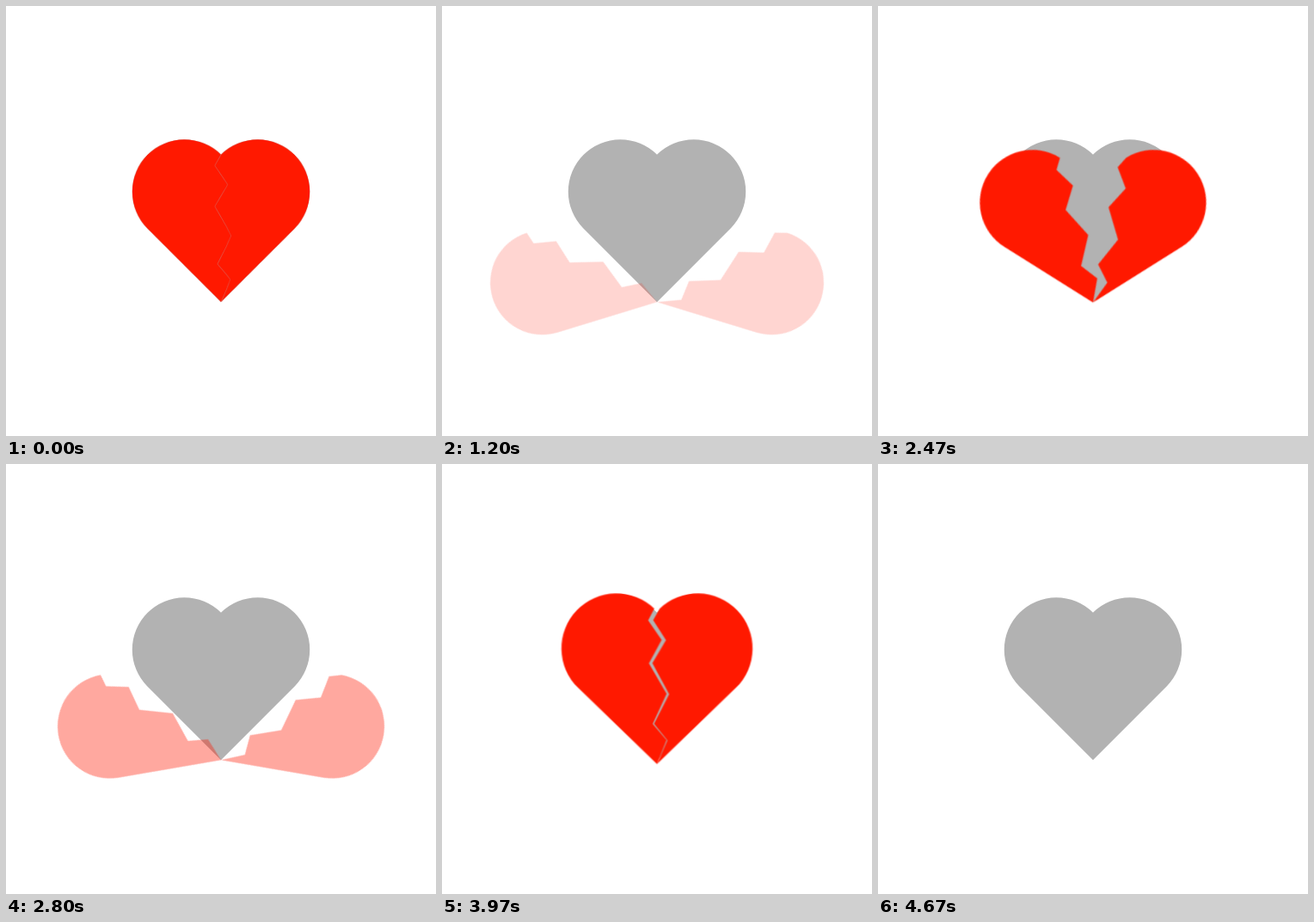
An HTML page that plays this animation: 500x500 px, repeating every 5.01 s.

```html
<!DOCTYPE html>
<html lang="en">
<head>
<meta charset="utf-8">
<title>Breaking heart</title>
<style>
  html, body { margin: 0; width: 100%; height: 100%; overflow: hidden; background: #fff; }
  svg { display: block; width: 100%; height: 100%; }

  .ghost { fill: #b2b2b2; }
  .heart, .half {
    animation: 1670ms cubic-bezier(.37, 0, .63, 1) infinite;
  }
  .heart {
    fill: #ff1900;
    transform-origin: 250px 258.5px;
    animation-name: pulse, fade;
  }
  .half {
    transform-origin: 250px 344.2px;
    animation-name: split;
  }
  .left { --turn: -71.5deg; }
  .right { --turn: 71.5deg; }

  @keyframes pulse {
    0%, 30.3% { transform: scale(1); }
    36.5% { transform: scale(1.055); }
    51.5%, 100% { transform: scale(1); }
  }
  /* The halves swing open around the bottom tip. */
  @keyframes split {
    0%, 34% { transform: rotate(0deg); }
    83.8%, 100% { transform: rotate(var(--turn)); }
  }
  @keyframes fade {
    0%, 51% { opacity: 1; }
    79.3% { opacity: .03; }
    79.31%, 100% { opacity: 0; }
  }
</style>
</head>
<body>
<svg viewBox="0 0 500 500">
  <path class="ghost" d="M250 172.8A60.6 60.6 0 0 0 164.3 258.5L250 344.2L335.7 258.5A60.6 60.6 0 0 0 250 172.8Z"/>
  <g class="heart">
    <path class="half left" d="M250 172.8A60.6 60.6 0 0 0 164.3 258.5L250 344.2L261 318L246 300L262 267L243 233L257.5 207.5L243 185.5Z"/>
    <path class="half right" d="M250 172.8A60.6 60.6 0 0 1 335.7 258.5L250 344.2L261 318L246 300L262 267L243 233L257.5 207.5L243 185.5Z"/>
  </g>
</svg>
</body>
</html>
```
